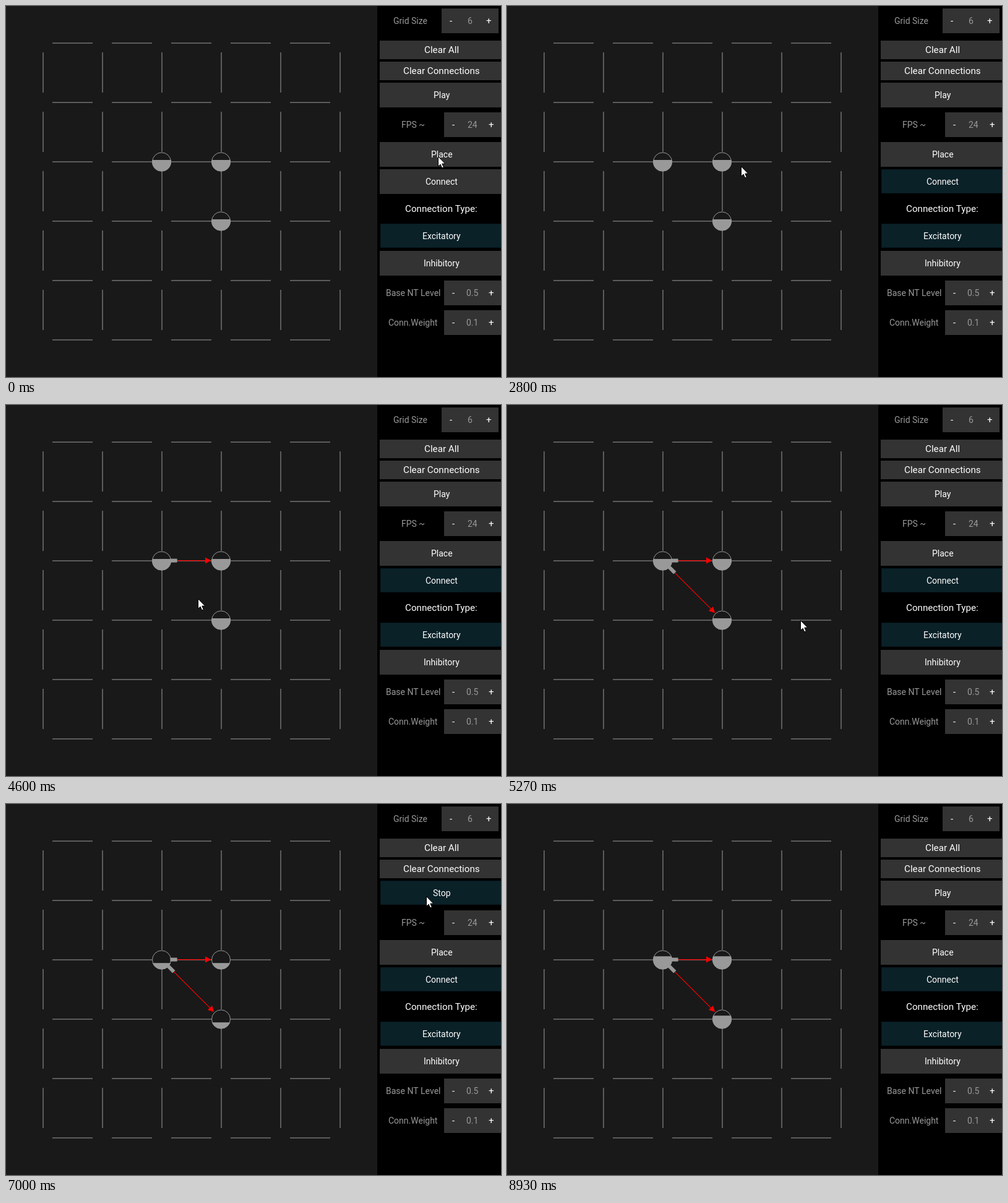
Recreate the animation shown at these times as an HTML page with a canvas. Size 800 by 600 pixels, loop 9.54 s.

```html
<!DOCTYPE html>
<html lang="en">
<head>
<meta charset="utf-8">
<title>Neuron grid</title>
<style>
  html, body { margin: 0; width: 100%; height: 100%; overflow: hidden; background: #191919; }
  canvas { display: block; }
</style>
</head>
<body>
<canvas id="stage" width="800" height="600"></canvas>
<script>
const ctx = document.getElementById('stage').getContext('2d');
const LOOP = 9540, STEP = 200 / 3;
const GRAY = '#999', BACK = '#191919', RED = '#f00';
const CELL = 96, RADIUS = 15, TICKS = 11;
const node = (column, row) => ({ x: 59.5 + column * CELL, y: 60 + row * CELL });
const [source, right, below] = [node(2, 2), node(3, 2), node(3, 3)];

// Moments at which the interface changes, in ms
const CONNECT_ON = 1800, FIRST_LINK = 3470, SECOND_LINK = 5000;
const PLAY_ON = 6130, PLAY_OFF = 8070, CURSOR_GONE = 8930;

// Each move glides the pointer from wherever it was to (x, y)
const move = (start, end, x, y) => ({ start, end, x, y });
const moves = [
  move(140, 730, 728, 287),
  move(730, 930, 717, 291),
  move(1200, 1530, 702, 290),
  move(2130, 2470, 751, 306),
  move(2470, 3130, 253, 243),
  move(3130, 3330, 346, 255),
  move(3400, 3870, 297, 284),
  move(3870, 4400, 250, 251),
  move(4400, 4930, 348, 352),
  move(5000, 5270, 474, 348),
  move(5270, 5870, 679, 149),
  move(8730, 8870, 317, 512)
];

const easeOut = part => 1 - (1 - part) ** 2;

function pointerAt(time) {
  let x = 698, y = 243;
  for (const step of moves) {
    if (time <= step.start) break;
    const part = easeOut(Math.min(1, (time - step.start) / (step.end - step.start)));
    x += (step.x - x) * part;
    y += (step.y - y) * part;
  }
  return { x: Math.round(x), y: Math.round(y) };
}

function rect(x, y, w, h, color) {
  ctx.fillStyle = color;
  ctx.fillRect(x, y, w, h);
}

function shape(points, color) {
  ctx.beginPath();
  for (const [x, y] of points) ctx.lineTo(x, y);
  ctx.closePath();
  ctx.fillStyle = color;
  ctx.fill();
}

function text(label, x, y, color = '#fff', size = 14) {
  ctx.font = `${size}px Roboto, sans-serif`;
  ctx.fillStyle = color;
  ctx.fillText(label, Math.round(x - ctx.measureText(label).width / 2), y + 5);
}

function button(label, y, height, pressed, size) {
  if (pressed) {
    rect(605, y, 195, height - 1, '#081b21');
    rect(606, y + 1, 194, height - 3, '#0a2128');
  } else {
    rect(604, y, 196, height, '#333');
  }
  text(label, 704, y + height / 2, '#fff', size);
}

function spinner(label, value, y, x = 708) {
  text(label, x - 50, y + 20, GRAY);
  rect(x, y, 92, 40, '#333');
  text('-', x + 15, y + 20, '#fff', 15);
  text(value, x + 46, y + 20, GRAY);
  text('+', x + 76, y + 20, '#fff', 15);
}

function drawPanel(time) {
  const playing = time >= PLAY_ON && time < PLAY_OFF;
  rect(600, 0, 200, 600, '#000');
  spinner('Grid Size', '6', 4, 704);
  button('Clear All', 56, 30, false, 15.2);
  button('Clear Connections', 90, 30, false, 15.2);
  button(playing ? 'Stop' : 'Play', 124, 40, playing);
  spinner('FPS ~', '24', 172);
  button('Place', 220, 40);
  button('Connect', 264, 40, time >= CONNECT_ON);
  text('Connection Type:', 703.5, 328, '#fff', 15.2);
  button('Excitatory', 352, 40, true);
  button('Inhibitory', 396, 40);
  spinner('Base NT Level', '0.5', 444);
  spinner('Conn.Weight', '0.1', 492);
}

function drawGrid() {
  for (let line = 0; line < 6; line++) {
    for (let cell = 0; cell < 5; cell++) {
      const across = 59 + line * CELL, along = 75 + cell * CELL;
      rect(along, across, 65, 2, '#5c5c5c');
      rect(across, along, 2, 65, '#5c5c5c');
    }
  }
}

// Fill height: climbs one notch per tick, then starts over
function fillAt(time) {
  const tick = Math.floor((Math.min(time, PLAY_OFF) - 6180) * 24 / 1000);
  const notch = (5 + Math.max(0, tick)) % TICKS;
  return (notch + 1.6) * 2 * RADIUS / TICKS;
}

function drawNeuron({ x, y }, fill) {
  const circle = radius => {
    ctx.beginPath();
    ctx.arc(x, y, radius, 0, 7);
  };
  ctx.save();
  circle(RADIUS);
  ctx.fillStyle = BACK;
  ctx.fill();
  ctx.strokeStyle = GRAY;
  ctx.lineWidth = 1;
  ctx.stroke();
  circle(RADIUS + 0.5);
  ctx.clip();
  rect(x - 16, y + RADIUS - fill, 32, fill + 1, GRAY);
  ctx.restore();
}

function drawLink(from, to) {
  const dx = to.x - from.x, dy = to.y - from.y;
  const length = Math.hypot(dx, dy), tip = length - 16, stub = 18 + length * 0.074;
  ctx.save();
  ctx.translate(from.x, from.y - 0.4);
  ctx.rotate(Math.atan2(dy, dx));
  rect(stub, -0.6, tip - 8 - stub, 1.2, RED);
  rect(14, -3, stub - 14, 6, GRAY);
  shape([[tip, 0], [tip - 9.5, -5], [tip - 9.5, 5]], RED);
  ctx.restore();
}

function drawPointer({ x, y }) {
  ctx.save();
  ctx.translate(x + 0.5, y + 0.5);
  ctx.lineWidth = 1;
  ctx.strokeStyle = '#000';
  shape([[0, 0], [0, 16], [3.6, 12.6], [6.2, 18.4], [8.8, 17.3], [6.3, 11.6], [11.2, 11.6]], '#fff');
  ctx.stroke();
  ctx.restore();
}

function draw(time) {
  rect(0, 0, 800, 600, BACK);
  drawGrid();
  for (const neuron of [source, right, below]) drawNeuron(neuron, fillAt(time));
  if (time >= FIRST_LINK) drawLink(source, right);
  if (time >= SECOND_LINK) drawLink(source, below);
  drawPanel(time);
  if (time < CURSOR_GONE) drawPointer(pointerAt(time));
}

// The picture advances 15 times a second, on times rounded to 10 ms
function sampleTime(time) {
  const step = Math.floor((time + 5) / STEP);
  return Math.round(step * STEP / 10) * 10;
}

const start = performance.now();
function frame() {
  draw(sampleTime((performance.now() - start) % LOOP));
  requestAnimationFrame(frame);
}
frame();
</script>
</body>
</html>
```
